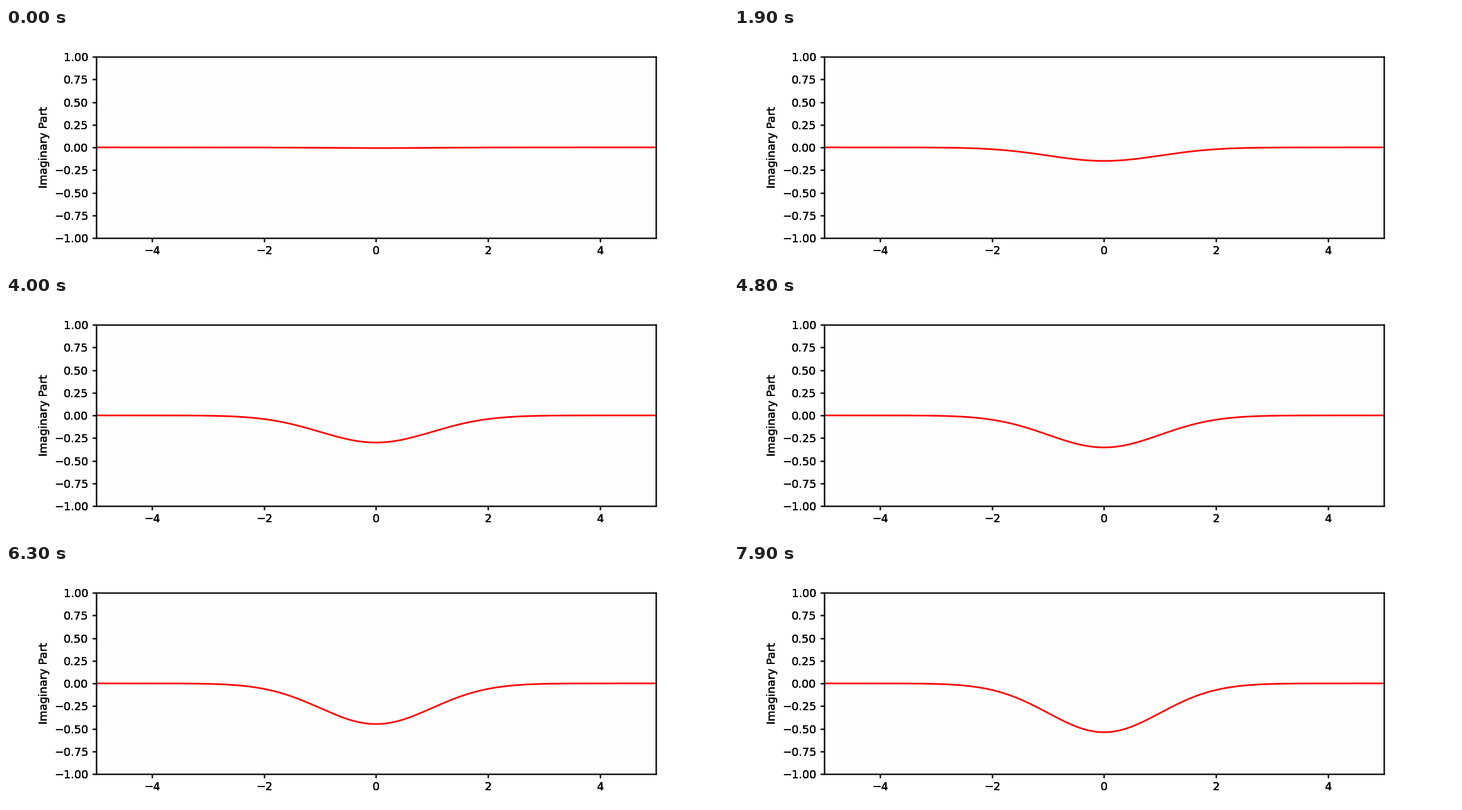
A matplotlib script that plays this animation: 1152x384 px, repeating every 8 s.

```python
import numpy as np
import matplotlib.pyplot as plt
from matplotlib.animation import FuncAnimation

FRAMES, INTERVAL = 80, 100
DT = 0.01
LAYERS = 4  # stacked axes give the labels and spines their hard edges
BOX = [0.125, 0.125, 0.775, 0.755]

plt.rcParams["font.family"] = "DejaVu Sans"
fig = plt.figure(figsize=(9, 3), dpi=128, facecolor="white")


def add_layer(face):
    ax = fig.add_axes(BOX, facecolor=face)
    ax.set_xlim(-5, 5)
    ax.set_ylim(-1, 1)
    ax.set_xticks(np.arange(-4, 5, 2))
    ax.set_yticks(np.arange(-1, 1.1, 0.25))
    ax.set_ylabel("Imaginary Part")
    return ax


main = add_layer("#fefefe")
for _ in range(LAYERS - 1):
    add_layer("none")

# Ground state of the harmonic oscillator, turning in phase
x = np.linspace(-5, 5, 1000)
ground = np.pi ** -0.25 * np.exp(-x ** 2 / 2)
(line,) = main.plot(x, 0 * x, color="red", lw=1.5)


def update(k):
    psi = ground * np.exp(-1j * DT * (k + 1))
    line.set_ydata(psi.imag)
    return (line,)


anim = FuncAnimation(fig, update, frames=FRAMES, interval=INTERVAL,
                     repeat=True, repeat_delay=0)
plt.show()
```
